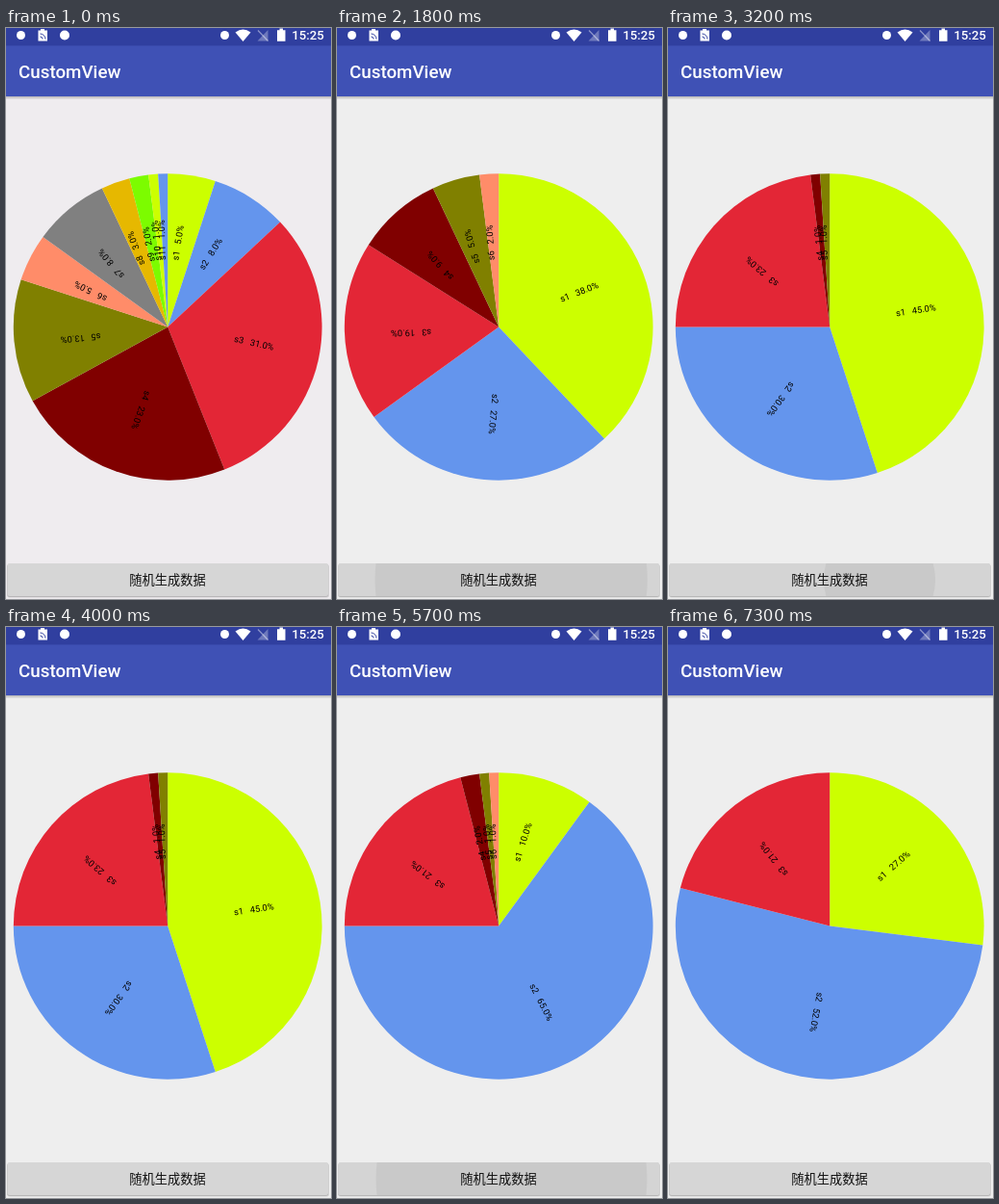
An HTML page for the animation above (7.7 s loop, 338 px wide and 593 px high).

```html
<!DOCTYPE html>
<html lang="zh">
<head>
<meta charset="utf-8">
<title>CustomView</title>
<style>
  html, body { margin: 0; width: 100%; height: 100%; overflow: hidden; background: #eee; }
  svg { display: block; width: 338px; height: 593px; }
  text { font-family: Roboto, sans-serif; }
  .bar { fill: #fff; font-weight: 500; }
  .label { font-size: 9.35px; fill: #000; }
  .caption { font: 500 13.25px "Noto Sans CJK SC", "Noto Sans CJK", sans-serif; text-anchor: middle; fill: #111; }
</style>
</head>
<body>
<svg viewBox="0 0 338 593">
  <defs>
    <linearGradient id="shade" x2="0" y2="1">
      <stop offset="0" stop-opacity=".24"/>
      <stop offset="1" stop-opacity="0"/>
    </linearGradient>
    <clipPath id="face"><rect x="1.5" y="556" width="333.5" height="34" rx="2"/></clipPath>
  </defs>

  <rect id="page" width="338" height="593" fill="#eee"/>
  <rect y="71" width="338" height="3.5" fill="url(#shade)"/>
  <rect y="18" width="338" height="53" fill="#3f51b5"/>
  <rect width="338" height="18.4" fill="#303f9f"/>
  <text class="bar" x="13" y="52.4" font-size="18.8">CustomView</text>

  <g fill="#fff">
    <circle cx="15.5" cy="7.5" r="4.5"/>
    <path d="M33.5 2.5h2.5v-1.5h4v1.5h3v11h-9.5z"/>
    <path d="M35.5 6a5.5 5.5 0 0 1 5.5 5.5M35.5 9a2.5 2.5 0 0 1 2.5 2.5" fill="none" stroke="#303f9f"/>
    <circle cx="61" cy="7.5" r="5"/>
    <circle cx="227.5" cy="7.5" r="4.5"/>
    <path d="M238.5 4.5Q246.5-1.5 254.5 4.5L246.5 14z"/>
    <path d="M272.5 2v11.5h-11z" opacity=".3"/>
    <path d="M262 2.5l10.5 11" stroke="#fff" stroke-width="1.2" opacity=".45"/>
    <path d="M282 2.2h2.5v-1.7h3.5v1.7h2.5v11.5h-8.5z"/>
  </g>
  <text class="bar" x="297.3" y="12.3" font-size="13.2">15:25</text>

  <g transform="translate(168.2 310.5) scale(1 .9925)">
    <g id="slices"></g>
    <g id="labels"></g>
  </g>

  <rect x="1" y="557" width="335" height="34.5" rx="2.5" opacity=".13"/>
  <rect x="1.5" y="556.5" width="333.5" height="34.3" rx="2" opacity=".16"/>
  <g clip-path="url(#face)">
    <rect x="1" y="556" width="335" height="34" fill="#d6d6d6"/>
    <g id="press">
      <rect x="1" y="556" width="335" height="34" fill="#d4d4d4"/>
      <circle id="ripple" cy="573" fill="#c9c9c9"/>
    </g>
  </g>
  <text class="caption" x="168" y="577.8">随机生成数据</text>
</svg>

<script>
const LOOP = 7700, STEP = 100, RADIUS = 160.4, LABEL_START = 70.2;
const COLORS = ['#ccff00', '#6495ed', '#e32636', '#800000', '#808000',
                '#ff8c69', '#808080', '#e6b800', '#7cfc00'];

// at: when the data changes; lead: how long the touch has lasted by then
const TOUCH_X = 247;
const clicks = [
  { at: 0,    lead: 999, data: [5, 8, 31, 23, 13, 5, 8, 3, 2, 1, 1] },
  { at: 1700, lead: 100, data: [38, 27, 19, 9, 5, 2] },
  { at: 2200, lead: 38,  data: [67, 29, 1, 2, 1] },
  { at: 2700, lead: 82,  data: [52, 24, 14, 7, 2, 1] },
  { at: 3200, lead: 82,  data: [45, 30, 23, 1, 1] },
  { at: 4300, lead: 90,  data: [41, 33, 12, 9, 4, 1] },
  { at: 5000, lead: 82,  data: [56, 5, 37, 2] },
  { at: 5600, lead: 99,  data: [10, 65, 21, 2, 1, 1] },
  { at: 6300, lead: 90,  data: [34, 38, 17, 8, 2, 1] },
  { at: 7000, lead: 90,  data: [27, 52, 21] }
];

const $ = id => document.getElementById(id);
const clamp = v => Math.max(0, Math.min(1, v));
const findLast = (list, test) => list.filter(test).pop();

function point(percent) {
  const a = percent / 50 * Math.PI;
  return `${(RADIUS * Math.sin(a)).toFixed(2)} ${(-RADIUS * Math.cos(a)).toFixed(2)}`;
}

function drawPie(data) {
  let sum = 0, slices = '', labels = '';
  data.forEach((value, i) => {
    const end = sum + value;
    const turn = (sum + value / 2) * 3.6 - 90;
    slices += `<path fill="${COLORS[i % COLORS.length]}" d="M0 0L${point(sum)}` +
      `A${RADIUS} ${RADIUS} 0 ${value > 50 ? 1 : 0} 1 ${point(end)}z"/>`;
    labels += `<text class="label" x="${LABEL_START}" transform="rotate(${turn})">` +
      `s${i + 1}\u00a0\u00a0\u00a0${value.toFixed(1)}%</text>`;
    sum = end;
  });
  $('slices').innerHTML = slices;
  $('labels').innerHTML = labels;
}

function drawPress(t) {
  const touch = findLast(clicks, c => c.at - c.lead <= t);
  const age = t - touch.at + touch.lead;
  const grow = clamp(age / 240);
  $('ripple').setAttribute('cx', 168 + (TOUCH_X - 168) * (1 - grow));
  $('ripple').setAttribute('r', 170 * grow);
  $('press').setAttribute('opacity', 1 - clamp((age - 280) / 110));
}

let shownStep = -1, shownData;
function frame() {
  const step = Math.floor(performance.now() % LOOP / STEP);
  if (step !== shownStep) {
    const t = step * STEP;
    const { data } = findLast(clicks, c => c.at <= t);
    if (data !== shownData) drawPie(shownData = data);
    drawPress(t);
    $('page').setAttribute('fill', t < 1600 ? '#efecef' : '#eee');
    shownStep = step;
  }
  requestAnimationFrame(frame);
}
frame();
</script>
</body>
</html>
```
